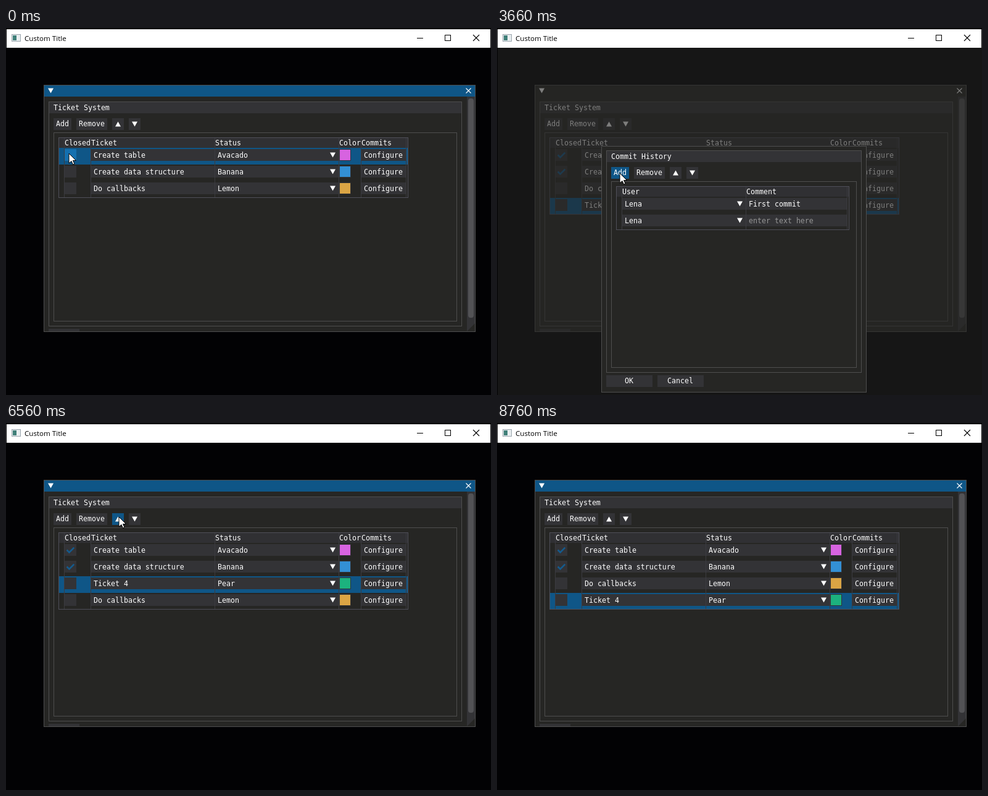
Animation of 786x594 px, one loop 9000 ms. Source, as an HTML page with a canvas:

```html
<!DOCTYPE html>
<html lang="en">
<head>
<meta charset="utf-8">
<title>Ticket table</title>
<style>
  html, body { margin: 0; width: 100%; height: 100%; overflow: hidden; background: #000; }
  canvas { display: block; }
</style>
</head>
<body>
<canvas id="stage" width="786" height="594"></canvas>
<script>
const ctx = document.getElementById('stage').getContext('2d');
const LOOP = 9000, ROW = 27, SIZE = 19;
const PANEL = '#262624', FRAME = '#333336', ACCENT = '#0f5687', EDGE = '#4e4e4e';
const TABLE_EDGE = '#4f4f59', TABLE_LINE = '#3b3b40', HEADER = '#303033', GREEN = '#1cb27e';
const MARK = 'rgba(0,119,200,.6)', GLOW = 'rgba(29,151,236,.404)';
const MONO = '11.627px "DejaVu Sans Mono", monospace';
const FRUIT = ['Avacado', 'Banana', 'Lemon', 'Pear'];
const USERS = ['Lena', 'Milo', 'Simon'];

// Where the pointer goes: arrival time and place; each click follows shortly after
const STEPS = {
  check1: [120, 102, 203], check2: [350, 103, 231], add: [690, 90, 155],
  below: [900, 100, 333], pick: [1130, 99, 293],
  openStatus: [2400, 527, 285], aim: [2760, 370, 361], pear: [2930, 370, 361],
  configure: [3180, 606, 287], addCommit: [3590, 199, 235],
  openUser: [4060, 391, 311], user: [4330, 252, 366], comment: [4560, 520, 312], ok: [5880, 214, 576],
  up: [6400, 183, 152], upAgain: [6900, 183, 152], down: [7400, 207, 147], downAgain: [7560, 207, 147],
  addLast: [7780, 90, 155], pickLast: [8120, 98, 311], remove: [8390, 138, 154], leave: [8760, 641, 263]
};
const ROUTE = Object.values(STEPS);
const clickTime = step => STEPS[step][0] + 60;

let now, mouse, live;

const done = step => now >= clickTime(step);
const between = (first, last) => done(first) && !done(last);
const clamp = v => Math.min(1, Math.max(0, v));
const over = (x, y, w, h) => mouse.x >= x && mouse.x < x + w && mouse.y >= y && mouse.y < y + h;
const typed = (word, start, gap) => word.slice(0, Math.floor((now - start) / gap) + 1);

function pointerPosition() {
  const i = ROUTE.findIndex(step => step[0] > now);
  if (i < 0) return { x: -99, y: -99 };
  const [end, x, y] = ROUTE[i], [start, fromX, fromY] = ROUTE[Math.max(0, i - 1)];
  const travel = Math.max(1, Math.min(300, end - start - 100));
  const u = clamp((now - end + travel) / travel), k = u * u * (3 - 2 * u);
  return { x: fromX + (x - fromX) * k, y: fromY + (y - fromY) * k };
}

function box(x, y, w, h, color) {
  ctx.fillStyle = color;
  ctx.fillRect(x, y, w, h);
}

function outline(x, y, w, h, color = EDGE) {
  ctx.strokeStyle = color;
  ctx.lineWidth = 1;
  ctx.strokeRect(x + .5, y + .5, w - 1, h - 1);
}

function text(str, x, y, color = '#fff', font = MONO) {
  ctx.font = font;
  ctx.fillStyle = color;
  ctx.fillText(str, x, y);
}

function line(points, color, width) {
  ctx.beginPath();
  points.forEach(([x, y]) => ctx.lineTo(x, y));
  ctx.strokeStyle = color;
  ctx.lineWidth = width;
  ctx.stroke();
}

function shape(points, color) {
  ctx.beginPath();
  points.forEach(([x, y]) => ctx.lineTo(x, y));
  ctx.closePath();
  ctx.fillStyle = color;
  ctx.fill();
}

function arrow(x, y, dir = 1) {
  const h = 3.9 * dir;
  shape([[x - 4.5, y - h], [x + 4.5, y - h], [x, y + h]], '#fff');
}

function cross(x, y, r, color) {
  line([[x - r, y - r], [x + r, y + r]], color, 1.1);
  line([[x + r, y - r], [x - r, y + r]], color, 1.1);
}

function button(x, y, w, label, pad = 4) {
  box(x, y, w, SIZE, live && over(x, y, w, SIZE) ? ACCENT : FRAME);
  if (label) text(label, x + pad, y + 13);
}

function field(x, y, w, value = '', color) {
  box(x, y, w, SIZE, FRAME);
  text(value, x + 4, y + 14, color);
}

function combo(x, y, value, open) {
  const hot = live && over(x, y, 200, SIZE);
  box(x, y, 181, SIZE, hot ? GLOW : FRAME);
  box(x + 181, y, SIZE, SIZE, hot || open ? GLOW : FRAME);
  text(value, x + 4, y + 14);
  arrow(x + 190.5, y + 9.5);
}

function popup(x, y, items, chosen) {
  const h = 12 + 17 * items.length;
  box(x, y, 200, h, PANEL);
  outline(x, y, 200, h);
  items.forEach((item, i) => {
    const top = y + 7 + 17 * i;
    if (over(x + 2, top, 196, 17)) box(x + 2, top, 196, 17, ACCENT);
    else if (item === chosen) box(x + 2, top, 196, 17, FRAME);
    text(item, x + 4, top + 12);
  });
}

function toolbar(x, y) {
  button(x, y, 29, 'Add');
  button(x + 37, y, 50, 'Remove');
  button(x + 95, y, SIZE);
  button(x + 122, y, SIZE);
  arrow(x + 104.5, y + 9.5, -1);
  arrow(x + 131.5, y + 9.5);
}

function group(x, y, w, h, title) {
  box(x, y, w, SIZE, FRAME);
  outline(x, y, w, h);
  text(title, x + 8, y + 14);
}

// `columns` pairs each left edge with its heading, `selected` is the lit row
function table(x, y, w, columns, rows, selected) {
  const h = 17 + ROW * rows;
  box(x, y, w, 17, HEADER);
  if (selected >= 0) box(x + 1, y + 17 + ROW * selected, w - 2, ROW, ACCENT);
  for (const [left, heading] of columns) {
    box(left - 1, y + 1, 1, h - 1, TABLE_LINE);
    text(heading, left, y + 13);
  }
  outline(x, y, w, h, TABLE_EDGE);
}

function checkbox(x, y, checked) {
  box(x, y, SIZE, SIZE, live && over(x, y, SIZE, SIZE) ? GLOW : FRAME);
  if (checked) line([[x + 3.6, y + 9.5], [x + 7.5, y + 13.4], [x + 15.3, y + 5.6]], MARK, 2.6);
}

function ticketRow(ticket, y, marked, open) {
  checkbox(95, y, ticket.done);
  field(138, y, 200);
  if (marked) box(142, y + 3, 70, 16, MARK);
  text(ticket.name, 142, y + 14);
  combo(339, y, ticket.status, open);
  box(541, y + 1, 17, 17, ticket.color);
  outline(540, y, SIZE, SIZE, FRAME);
  box(576, y, 72, SIZE, live && over(576, y, 72, SIZE) ? ACCENT : FRAME);
  text('Configure', 580, y + 14);
}

function desktopFrame() {
  box(0, 0, 786, 594, '#020204');
  box(1, 2, 784, 30, '#fff');
  box(9, 10, 15, 12, '#9aa5ad');
  box(10, 11, 13, 10, '#e9eef0');
  box(11, 12, 6, 8, '#3f7f78');
  text('Custom Title', 30, 21, '#000', '11.6px "Open Sans", sans-serif');
  box(666, 16, 10, 1, '#000');
  outline(711, 11, 10, 10, '#000');
  cross(762, 16, 5, '#000');
}

function ticketOrder() {
  const order = [0, 1, 2];
  const lift = done('up') + done('upAgain') - done('down') - done('downAgain');
  if (done('add')) order.splice(3 - lift, 0, 3);
  if (between('addLast', 'remove')) order.push(4);
  return order;
}

function ticketWindow(modal) {
  const selecting = now >= 1600 && now < 1630;
  const open = between('openStatus', 'pear');
  const tickets = [
    { name: 'Create table', status: 'Avacado', color: '#d763e0', done: done('check1') },
    { name: 'Create data structure', status: 'Banana', color: '#3390d5', done: done('check2') },
    { name: 'Do callbacks', status: 'Lemon', color: '#dba544' },
    { name: now < 1630 ? 'New Ticket' : typed('Ticket 4', 1630, 38),
      status: done('pear') ? 'Pear' : 'Avacado', color: GREEN },
    { name: 'New Ticket', status: 'Avacado', color: GREEN }
  ];
  const order = ticketOrder();
  const chosen = between('pickLast', 'remove') ? 4 : done('pick') ? 3 : done('check2') ? 1 : 0;
  live = !modal && !open;

  box(61, 92, 700, 400, PANEL);
  if (!modal) box(62, 93, 698, 18, ACCENT);
  arrow(72.5, 101.5);
  cross(749.5, 101.5, 4, '#fff');
  box(747, 111, 13, 380, FRAME);
  shape([[760, 478], [760, 491], [747, 491]], PANEL);
  ctx.beginPath();
  ctx.roundRect(749, 114, 9, 355, 4);
  ctx.fillStyle = '#525255';
  ctx.fill();
  box(69, 487, 50, 4, FRAME);
  outline(61, 92, 700, 400);

  group(69, 119, 670, 364, 'Ticket System');
  toolbar(77, 146);
  outline(77, 169, 654, 306);
  const columns = [[95, 'Closed'], [138, 'Ticket'], [339, 'Status'], [540, 'Color'], [576, 'Commits'], [649, '']];
  table(85, 177, 567, columns, order.length, order.indexOf(chosen));
  order.forEach((id, i) => ticketRow(tickets[id], 196 + ROW * i, id === 3 && selecting, id === 3 && open));
  if (open) popup(339, 296, FRUIT, FRUIT[0]);
}

function commitDialog() {
  const open = between('openUser', 'user');
  const rows = done('addCommit') ? 2 : 1;
  live = !open;

  box(169, 191, 430, 399, PANEL);
  outline(169, 191, 430, 399);
  group(177, 198, 414, 360, 'Commit History');
  toolbar(185, 225);
  outline(185, 248, 398, 302);
  table(193, 256, 378, [[203, 'User'], [404, 'Comment'], [568, '']], rows, done('openUser') ? 1 : -1);
  combo(203, 275, USERS[0]);
  field(404, 275, 163, 'First commit');
  if (rows > 1) {
    combo(203, 275 + ROW, USERS[done('user') ? 2 : 0], open);
    if (now < 4760) field(404, 275 + ROW, 163, 'enter text here', '#979797');
    else field(404, 275 + ROW, 163, typed('Second commit', 4760, 45));
  }
  button(177, 562, 75, 'OK', 30);
  button(260, 562, 75, 'Cancel', 16);
  if (open) popup(203, 321, USERS, USERS[0]);
}

function pointer() {
  ctx.save();
  ctx.translate(Math.round(mouse.x), Math.round(mouse.y));
  const tip = [[0, 0], [0, 16], [4, 12.5], [6.5, 18], [9, 17], [6.5, 11.5], [11.5, 11.5]];
  shape(tip, '#fff');
  line([...tip, tip[0]], '#000', 1);
  ctx.restore();
}

function draw() {
  const modal = between('configure', 'ok');
  const dim = clamp((now - clickTime('configure')) / 160) * clamp(1 - (now - clickTime('ok')) / 150);
  mouse = pointerPosition();
  desktopFrame();
  ticketWindow(modal);
  box(1, 32, 785, 562, `rgba(37,37,35,${.588 * dim})`);
  if (modal) commitDialog();
  pointer();
}

function tick() {
  now = performance.now() % LOOP;
  draw();
  requestAnimationFrame(tick);
}
tick();
</script>
</body>
</html>
```
